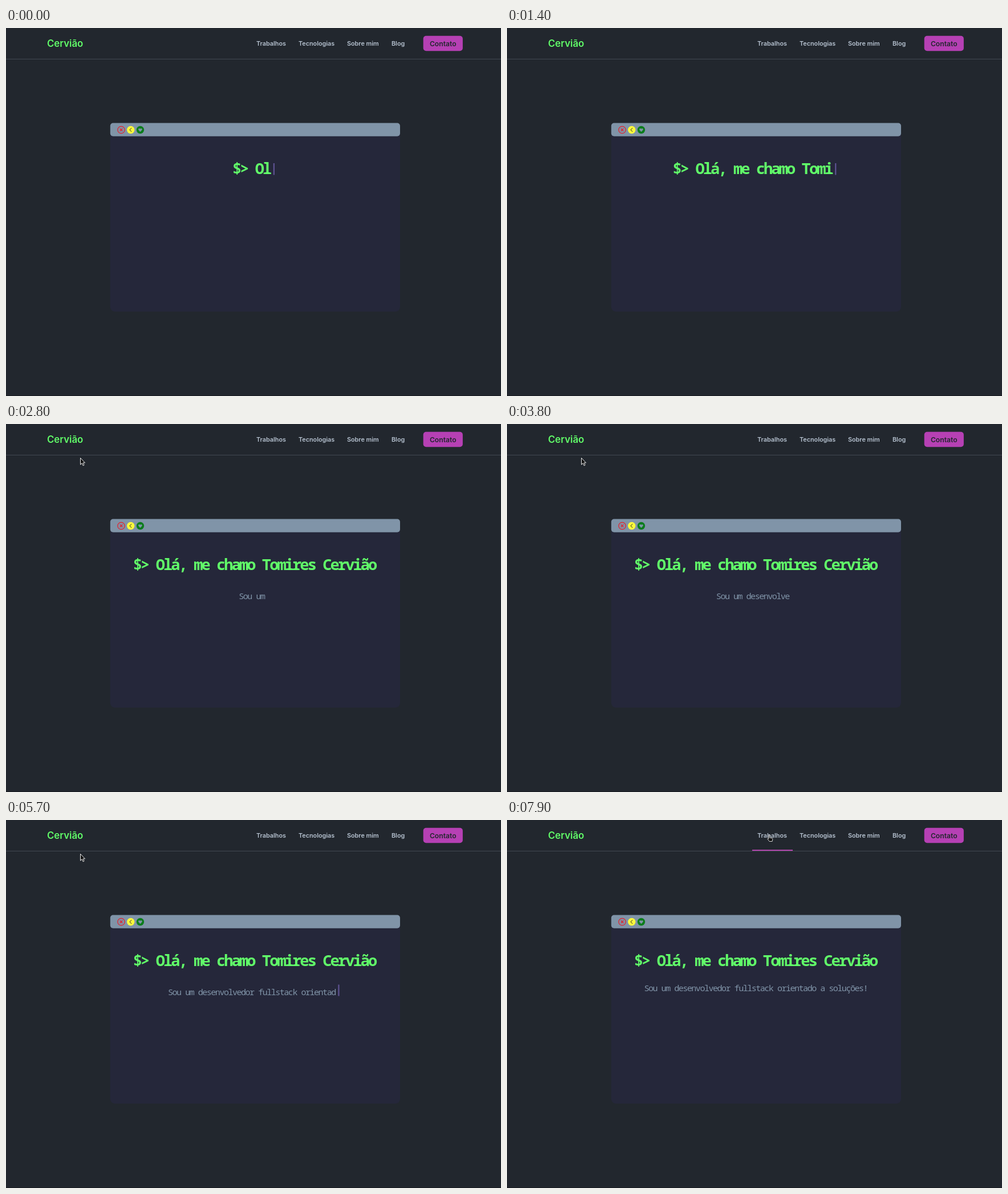
Animation of 868x645 px, one loop 8000 ms. Source, as an HTML page:

```html
<!DOCTYPE html>
<html lang="pt">
<head>
<meta charset="utf-8">
<style>
  html, body { margin: 0; width: 100%; height: 100%; overflow: hidden; background: #22272e; }
  svg { display: block; }
  text { white-space: pre; }
  .ui { font: 600 10.8px Inter, sans-serif; fill: #b6c2d0; }
  .ui .brand { font-size: 16.8px; fill: #61fd69; }
  .ui .contact { font-size: 12.2px; fill: #22272e; }
  .mono { font-family: "Noto Sans Mono", monospace; font-stretch: extra-condensed; }
  #title { font-size: 27px; font-weight: 800; letter-spacing: -2.9px; fill: #61fd69; }
  #intro { font-size: 15px; font-weight: 500; letter-spacing: -1.47px; fill: #8094a8; }
  .caret { fill: #5f5394; }
  .pointer { fill: #111; stroke: #e8e8e8; stroke-linejoin: round; }
</style>
</head>
<body>
<svg width="868" height="645" viewBox="0 0 868 645">
  <rect y="54" width="868" height="1" fill="#414851"/>
  <rect y="644" width="868" height="1" fill="#191c21"/>
  <g class="ui">
    <text class="brand" x="72" y="33">Cervião</text>
    <text x="439" y="31">Trabalhos</text>
    <text x="513" y="31">Tecnologias</text>
    <text x="598" y="31">Sobre mim</text>
    <text x="676" y="31">Blog</text>
    <rect x="731.7" y="13.7" width="69.2" height="26.5" rx="5" fill="#b640b4"/>
    <text class="contact" x="766.3" y="31.5" text-anchor="middle">Contato</text>
  </g>
  <rect id="underline" y="52" height="2" fill="#b044ab"/>

  <rect x="182.8" y="167" width="508.2" height="330" rx="8" fill="#25273a"/>
  <rect x="182.8" y="166.5" width="508.2" height="23.2" rx="5" fill="#8094a8"/>
  <g fill="none" stroke-width="1.3">
    <circle cx="202" cy="178.5" r="6.2" stroke="#e0242f"/>
    <path d="M199.8 176.3l4.4 4.4m0-4.4l-4.4 4.4" stroke="#e0242f"/>
    <circle cx="218.7" cy="178.5" r="6.7" fill="#fdfa3c"/>
    <path d="M220.2 175.2l-3.3 3.3 3.3 3.3" stroke="#6a6a34" stroke-width="1.1"/>
    <circle cx="235.4" cy="178.5" r="6.7" fill="#0c7d1c"/>
    <path d="M235.4 182l-3-3.2c-1.2-2.4 1.6-4 3-2 1.4-2 4.2-.4 3 2z" fill="#8094a8"/>
  </g>

  <text id="title" class="mono" y="256"></text>
  <text id="intro" class="mono"></text>
  <rect id="titleCaret" class="caret" y="237" width="2.2" height="20.5"/>
  <rect id="introCaret" class="caret" y="288.5" width="2.2" height="20"/>
  <rect id="lastCaret" class="caret" x="435.3" y="322" width="2.2" height="20"/>

  <path id="arrow" class="pointer" d="M.5.5v11.7l2.7-2.5 1.9 4.2 1.9-.9-1.9-4h3.4z"/>
  <path id="hand" class="pointer" stroke-width=".9"
    d="M.3 1q1-1.2 2 0v4l4.3.9q.8.4.7 1.5l-.7 4.1h-5l-3.3-4.2q.2-1.2 1.2-.8l.8.8z"/>
</svg>
<script>
const $ = id => document.getElementById(id);
const LOOP = 8, CENTER = 437, RATE = 11.6, CARET_SPACE = 10.8;
const TITLE_START = -0.49, INTRO_START = 2.27, INTRO_END = 6.76;
const TITLE = "$> Olá, me chamo Tomires Cervião";
const INTRO = "Sou um desenvolvedor fullstack orientado a soluções!";

// Pointer path: seconds, x, y
const PATH = [[1.5, 98, -16], [1.6, 106, 2], [1.8, 119, 15.5], [2.1, 130, 59],
  [6.95, 130, 59], [7.6, 440, 33], [7.7, 457, 19], [7.8, 458, 26], [8, 459, 26]];

const show = (el, on) => el.setAttribute("visibility", on ? "visible" : "hidden");
const blink = (t, start) => ((t - start) % 1 + 1) % 1 < 0.5;

// Types a centred line; while typing, the caret takes up room even when it is dark.
function type(line, caret, text, advance, inset, t, start, end, blinkStart) {
  const count = Math.max(0, Math.floor(RATE * (t - start)));
  const typing = t >= start && t < end;
  const shown = text.slice(0, t < end ? count : text.length).trimEnd();
  const width = shown.length * advance;
  const left = CENTER - (width + (typing ? CARET_SPACE : 0)) / 2;
  line.textContent = shown;
  line.setAttribute("x", left - inset);
  caret.setAttribute("x", left + width + 3.9);
  show(caret, typing && blink(t, blinkStart));
}

function pointerAt(t) {
  const i = PATH.findIndex(p => p[0] > t);
  if (i < 1) return null;
  const [t0, x0, y0] = PATH[i - 1], [t1, x1, y1] = PATH[i];
  let k = (t - t0) / (t1 - t0);
  if (t1 - t0 > 0.25) k = k * k * (3 - 2 * k);
  return [x0 + (x1 - x0) * k, y0 + (y1 - y0) * k];
}

function draw(now) {
  const t = now / 1000 % LOOP;
  type($("title"), $("titleCaret"), TITLE, 13.3, 1.45, t, TITLE_START, INTRO_START, 0.95);
  type($("intro"), $("introCaret"), INTRO, 7.53, 0.73, t, INTRO_START, INTRO_END, 2.26);
  $("intro").setAttribute("y", t < INTRO_END ? 307 : 300);
  show($("lastCaret"), t >= INTRO_END && t < INTRO_END + 0.5);

  const hover = Math.min(1, Math.max(0, (t - 7.65) / 0.3));
  const half = 36 * (1 - (1 - hover) ** 2.4);
  $("underline").setAttribute("x", 465.5 - half);
  $("underline").setAttribute("width", 2 * half);

  const at = pointerAt(t), linked = t >= 7.65;
  show($("arrow"), at && !linked);
  show($("hand"), at && linked);
  if (at) $(linked ? "hand" : "arrow").setAttribute("transform", `translate(${at})`);
  requestAnimationFrame(draw);
}
requestAnimationFrame(draw);
</script>
</body>
</html>
```
